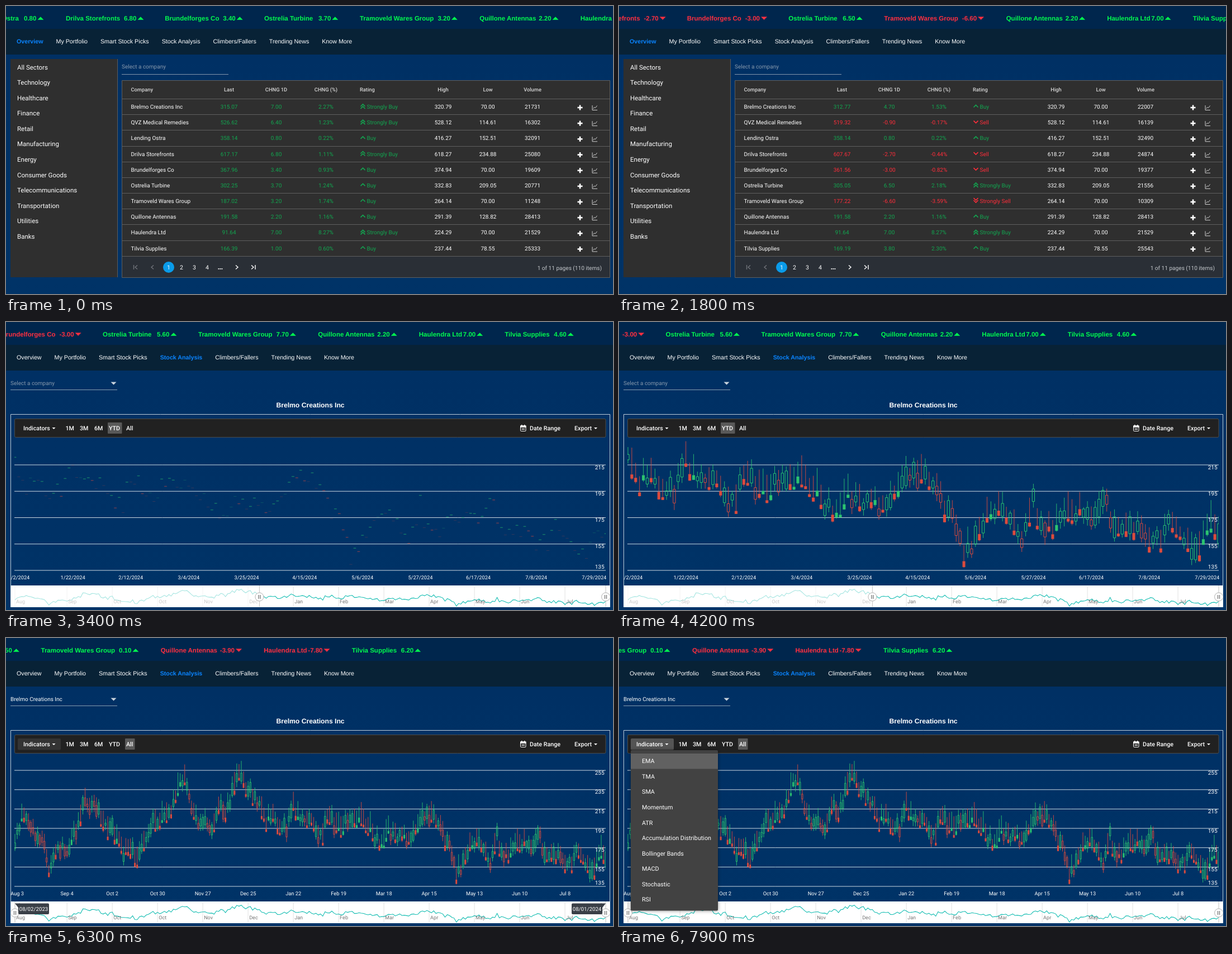
These frames come from a looping animation (1086 px wide and 516 px high, 8000 ms). An HTML page with a canvas:

```html
<!DOCTYPE html>
<html lang="en">
<head>
<meta charset="utf-8">
<title>Stock dashboard</title>
<style>
html, body { margin: 0; width: 100%; height: 100%; overflow: hidden; background: #003166; }
canvas { display: block; width: 1086px; height: 516px; }
</style>
</head>
<body>
<canvas id="stage"></canvas>
<script>
const W = 1086, H = 516, LOOP = 8000, STEP = 100;
const canvas = document.getElementById('stage');
const dpr = window.devicePixelRatio || 1;
canvas.width = W * dpr;
canvas.height = H * dpr;
const c = canvas.getContext('2d');
c.textRendering = 'geometricPrecision';

const ROBOTO = 'Roboto, sans-serif', ARIAL = '"Liberation Sans", Arial, sans-serif';
const UP = '#2ecc71', DOWN = '#e74c3c';

// name, base price, changes over time, high, low, volumes, ticker pitch, value offset
const stocks = [
  ['Brelmo Creations Inc', 308.07, [7, 4.7], '320.79', '70.00', [21731, 22007]],
  ['QVZ Medical Remedies', 520.22, [6.4, -0.9], '528.12', '114.61', [16302, 16139]],
  ['Lending Ostra', 357.34, [0.8, 0.8, 0.8, 0.8], '416.27', '152.51', [32091, 32490], 162, 87],
  ['Drilva Storefronts', 610.37, [6.8, -2.7, 2.9, 2.9], '618.27', '234.88', [25080, 24874], 177.3, 104],
  ['Brundelforges Co', 364.56, [3.4, -3, -3, 1.2], '374.94', '70.00', [19609, 19377], 177.6, 104],
  ['Ostrelia Turbine', 298.55, [3.7, 6.5, 5.6, 2.5], '332.83', '209.05', [20771, 21556], 171, 97],
  ['Tramoveld Wares Group', 183.82, [3.2, -6.6, 7.7, 0.1], '264.14', '70.00', [11248, 10309], 214.3, 139.5],
  ['Quillone Antennas', 189.38, [2.2, 2.2, 2.2, -3.9], '291.39', '128.82', [28413, 28413], 180.5, 106],
  ['Haulendra Ltd', 84.64, [7, 7, 7, -7.8], '224.29', '70.00', [21529, 21529], 153.5, 79],
  ['Tilvia Supplies', 165.39, [1, 3.8, 4.6, 6.2], '237.44', '78.55', [25333, 25543], 150, 88]
].map(([name, base, chg, high, low, vol, pitch, off]) => ({ name, base, chg, high, low, vol, pitch, off }));

const tabs = ['Overview', 'My Portfolio', 'Smart Stock Picks', 'Stock Analysis', 'Climbers/Fallers', 'Trending News', 'Know More'];
const sectors = ['All Sectors', 'Technology', 'Healthcare', 'Finance', 'Retail', 'Manufacturing', 'Energy',
  'Consumer Goods', 'Telecommunications', 'Transportation', 'Utilities', 'Banks'];
const indicators = ['EMA', 'TMA', 'SMA', 'Momentum', 'ATR', 'Accumulation Distribution', 'Bollinger Bands', 'MACD', 'Stochastic', 'RSI'];
const months = ['Jan', 'Feb', 'Mar', 'Apr', 'May', 'Jun', 'Jul', 'Aug', 'Sep', 'Oct', 'Nov', 'Dec'];

// Trend of the price, one point per three trading days
const trend = [183, 205, 198, 189, 189, 155, 168, 177, 175, 190, 219, 216, 217, 206, 193, 189, 170, 170, 164, 183,
  193, 204, 210, 214, 240, 249, 219, 201, 204, 196, 220, 207, 236, 254, 238, 233, 218, 203, 207, 196, 195, 217,
  208, 206, 199, 185, 208, 198, 201, 201, 201, 208, 200, 187, 177, 194, 187, 190, 182, 190, 208, 211, 203, 190,
  177, 148, 161, 178, 185, 169, 161, 187, 166, 169, 182, 179, 177, 187, 172, 169, 172, 159, 161, 172, 161, 145, 172, 163];
const LAST = 261, YTD = 108, X0 = 16, X1 = 1073, BASE = 445;

const candles = makeCandles();

function makeCandles() {
  let seed = 41;
  const rnd = () => (seed = (seed * 16807) % 2147483647) / 2147483647;
  for (let i = 0; i < 9; i++) rnd();
  let prev = 180;
  return Array.from({ length: LAST + 1 }, (_, i) => {
    const k = Math.floor(i / 3), f = i / 3 - k;
    const mid = lerp(trend[k], trend[Math.min(k + 1, trend.length - 1)], f) + (rnd() - 0.5) * 10;
    const low = Math.max(136, mid - 6 - 5 * rnd()), high = mid + 5 + 10 * rnd();
    const open = low + 2 + 4 * rnd();
    const close = rnd() < 0.4 ? low + (open - low) * 0.3 * rnd() : lerp(open, high, 0.3 + 0.55 * rnd());
    const color = close < prev ? DOWN : UP;
    prev = close;
    return { low, high, open, close, color };
  });
}

function lerp(a, b, f) { return a + (b - a) * f; }
function clamp01(v) { return Math.max(0, Math.min(1, v)); }

function track(keys, t) {
  let i = 1;
  while (i < keys.length - 1 && keys[i][0] < t) i++;
  const [ta, a] = keys[i - 1], [tb, b] = keys[i];
  return lerp(a, b, (t - ta) / (tb - ta));
}

function text(s, x, y, size, color = '#fff', { weight = 400, align = 'left', font = ROBOTO } = {}) {
  c.font = `${weight} ${size}px ${font}`;
  c.textAlign = align;
  c.fillStyle = color;
  c.fillText(s, x, y + size * 0.36);
}

function rect(x, y, w, h, fill, stroke, r = 0) {
  c.beginPath();
  c.roundRect(x, y, w, h, r);
  if (fill) { c.fillStyle = fill; c.fill(); }
  if (stroke) { c.strokeStyle = stroke; c.lineWidth = 1; c.stroke(); }
}

function line(points, color, width = 1) {
  c.beginPath();
  points.forEach(([x, y]) => c.lineTo(x, y));
  c.strokeStyle = color;
  c.lineWidth = width;
  c.stroke();
}

function poly(points, color) {
  c.beginPath();
  points.forEach(([x, y]) => c.lineTo(x, y));
  c.fillStyle = color;
  c.fill();
}

// dir: 1 points down, -1 points up
function caret(x, y, w, dir, color) {
  const h = w / 4 * dir;
  poly([[x - w / 2, y - h], [x + w / 2, y - h], [x, y + h]], color);
}

function hline(x1, x2, y, color) { line([[x1, y], [x2, y]], color); }

function dayDate(i) {
  const n = i + 2;
  return new Date(Date.UTC(2023, 6, 31 + Math.floor(n / 5) * 7 + n % 5));
}
function longDate(i, pad) {
  const d = dayDate(i), p = v => pad ? String(v).padStart(2, '0') : v;
  return `${p(d.getUTCMonth() + 1)}/${p(d.getUTCDate())}/${d.getUTCFullYear()}`;
}
function shortDate(i) {
  const d = dayDate(i);
  return `${months[d.getUTCMonth()]} ${d.getUTCDate()}`;
}

const tickerPath = [[0, 107], [1000, 12], [2200, -95.3], [3200, -185.9], [3400, -185.9], [3500, -213],
  [5200, -364.4], [6300, -463.4], [7900, -609.2], [8000, -618.3]];

function drawTicker(t) {
  const set = t < 1000 ? 0 : t < 2000 ? 1 : t < 4300 ? 2 : 3;
  const style = { weight: 700, font: ARIAL };
  let x = track(tickerPath, t) - stocks[2].pitch;
  for (const s of stocks.slice(2)) {
    const v = s.chg[set], neg = v < 0, color = neg ? '#ff2f40' : '#00fa4f';
    text(s.name, x, 22, 11.5, color, style);
    text(v.toFixed(2), x + s.off, 22, 11.5, color, style);
    caret(x + s.off + c.measureText(v.toFixed(2)).width + 7.5, 22, 11, neg ? 1 : -1, color);
    x += s.pitch + (neg ? 4 : 0);
  }
}

function drawTabs(active) {
  let x = 19;
  tabs.forEach((s, i) => {
    const on = i === active;
    text(s, x, 63.5, 10.7, on ? '#0a84ff' : '#fff', { weight: on ? 700 : 400, font: ARIAL });
    x += c.measureText(s).width + 23;
  });
}

function drawFrame() {
  const g = c.createLinearGradient(0, 87, 0, H);
  g.addColorStop(0, '#003064');
  g.addColorStop(1, '#003367');
  c.fillStyle = g;
  c.fillRect(0, 0, W, H);
  rect(0, 0, W, 41, '#00264d');
  rect(0, 41, W, 46, '#082236');
}

function drawRating(v, y, color) {
  const dir = v > 0 ? 1 : -1, strong = Math.abs(v) > 6;
  const mark = yy => line([[634.5, yy + 4 * dir], [638.5, yy], [642.5, yy + 4 * dir]], color, 1.6);
  if (strong) { mark(y - 1 - 3.5 * dir); mark(y - 1 + 0.5 * dir); }
  else mark(y - 1 - 2 * dir);
  text((strong ? 'Strongly ' : '') + (v > 0 ? 'Buy' : 'Sell'), 645.5, y, 10, color);
}

function drawPager() {
  const y = 468, dim = '#70747a', white = '#fff';
  const arrow = (x, dir, color) => line([[x - 2 * dir, y - 3.5], [x + 2 * dir, y], [x - 2 * dir, y + 3.5]], color, 1.4);
  arrow(233, -1, dim);
  line([[228.5, y - 4], [228.5, y + 4]], dim, 1.4);
  arrow(262, -1, dim);
  c.beginPath();
  c.arc(291, y, 10, 0, Math.PI * 2);
  c.fillStyle = '#0a9be9';
  c.fill();
  ['1', '2', '3', '4'].forEach((s, i) => text(s, 291 + i * 23, y + 0.5, 10.5, white, { align: 'center' }));
  for (let i = 0; i < 3; i++) rect(379.5 + i * 3, 470, 1.8, 1.8, white);
  arrow(413, 1, white);
  arrow(441, 1, white);
  line([[446, y - 4], [446, y + 4]], white, 1.4);
  text('1 of 11 pages (110 items)', 1066, 469.5, 10.1, '#c4c8cc', { align: 'right' });
}

function drawOverview(t) {
  const set = t < 1000 ? 0 : 1, mid = { align: 'center' };
  rect(8, 95, 191.5, 391, '#2f2f2f');
  line([[199.5, 95], [199.5, 486]], '#5c5c5c');
  sectors.forEach((s, i) => text(s, 20, 109.5 + i * 27.57, 11.5));

  text('Select a company', 207, 108.5, 10, '#8798ac');
  hline(207, 398, 122.5, '#8396ab');

  rect(207.5, 133.5, 873, 353, '#2f2f2f', '#5f5f5f');
  rect(208, 448, 872, 38, '#2a2f36');
  const head = { weight: 500, align: 'center' }, grey = '#d6d6d6';
  text('Company', 223.5, 150, 9.3, grey, { weight: 500 });
  text('Rating', 633, 150, 9.3, grey, { weight: 500 });
  [['Last', 399], ['CHNG 1D', 483.5], ['CHNG (%)', 572.5], ['High', 782], ['Low', 862], ['Volume', 942]]
    .forEach(([s, x]) => text(s, x, 150, 9.3, grey, head));

  stocks.forEach((s, i) => {
    const y = 180.5 + i * 28.17, v = s.chg[set], color = v < 0 ? '#ff2d3a' : '#12a650';
    hline(208, 1080, Math.round(y - 14.5) + 0.5, '#5f5f5f');
    text(s.name, 223.5, y, 10);
    text((s.base + v).toFixed(2), 399, y, 10, color, mid);
    text(v.toFixed(2), 483.5, y, 10, color, mid);
    text((v / s.base * 100).toFixed(2) + '%', 572.5, y, 10, color, mid);
    drawRating(v, y, color);
    text(s.high, 782, y, 10, '#fff', mid);
    text(s.low, 862, y, 10, '#fff', mid);
    text(s.vol[set], 942, y, 10, '#fff', mid);
    const iy = y + 1.5;
    line([[1022.5, iy], [1031.5, iy]], '#fff', 2.6);
    line([[1027, iy - 4.5], [1027, iy + 4.5]], '#fff', 2.6);
    line([[1049, iy - 4], [1049, iy + 4.5], [1058, iy + 4.5]], '#d0d0d0', 1);
    line([[1050.5, iy + 2], [1052.5, iy - 0.5], [1054.5, iy + 0.5], [1057.5, iy - 3.5]], '#d0d0d0', 1);
  });
  hline(208, 1080, 448.5, '#5f5f5f');
  drawPager();
}

function drawSelect(t) {
  const chosen = t >= 4600;
  text(chosen ? stocks[0].name : 'Select a company', 8, 109.5, 10, chosen ? '#fff' : '#8798ac');
  hline(8, 199, 121.5, '#8a9cb0');
  caret(192.5, 110, 10, 1, '#c9d3de');
}

function drawToolbar(t) {
  rect(15.5, 173.5, 1057.5, 33, '#212121', '#4c4c4c', 2);
  if (t >= 6200) rect(21, 180, 77, 20.5, t < 6600 ? '#343434' : '#555', null, 2);
  if (t < 5000) rect(182, 180, 25.5, 20, '#595959', null, 1);
  else rect(213, 180, 17.5, 20, '#595959', null, 1);
  const w = { weight: 500 };
  text('Indicators', 31, 190, 10.7, '#fff', w);
  caret(85.5, 190.5, 6, 1, '#fff');
  [['1M', 106.5], ['3M', 132], ['6M', 158], ['YTD', 184], ['All', 215]].forEach(([s, x]) => text(s, x, 190, 10.7, '#fff', w));
  rect(920.5, 186, 9.5, 9.5, null, '#fff', 1);
  rect(920, 185.5, 10.5, 3.5, '#fff');
  rect(922, 184, 1.4, 3, '#fff');
  rect(927, 184, 1.4, 3, '#fff');
  rect(922.5, 191, 5.5, 1.5, '#fff');
  text('Date Range', 937, 190, 10.7, '#fff', w);
  text('Export', 1017, 190, 10.7, '#fff', w);
  caret(1055, 190.5, 6, 1, '#fff');
}

function pixelsPerUnit(left) {
  return track([[0, 1.7325], [99, 1.7325], [102, 1.9125], [YTD, 2.3625]], left);
}

function drawPlot(t, left) {
  const ppu = pixelsPerUnit(left), step = (X1 - X0) / (LAST - left);
  const px = i => X1 - (LAST - i) * step, py = v => BASE - (v - 135) * ppu;

  for (let v = 135; py(v) > 213; v += 20) hline(15, X1, py(v), 'rgba(255,255,255,.8)');

  if (t >= 3400) {
    const grow = 1 - Math.pow(1 - clamp01((t - 3400) / 800), 3);
    c.save();
    c.beginPath();
    c.rect(15, 207, X1 - 15, BASE - 206);
    c.clip();
    c.globalAlpha = lerp(0.35, 0.95, grow);
    const w = step * 0.72 - 0.7;
    candles.forEach((d, i) => {
      if (i < left) return;
      const x = px(i), m = (d.open + d.close) / 2, y = v => py(lerp(m, v, grow));
      const top = y(Math.max(d.open, d.close)), bottom = y(Math.min(d.open, d.close));
      line([[x, y(d.high)], [x, top]], d.color, 0.9);
      line([[x, bottom], [x, y(d.low)]], d.color, 0.9);
      const h = Math.max(bottom - top, 0.6);
      if (d.close < d.open) rect(x - w / 2 - 0.4, top, w + 0.8, Math.max(h, grow * 5), d.color);
      else rect(x - w / 2, top, w, h, null, d.color);
    });
    c.restore();
  }

  for (let v = 135; py(v) > 213; v += 20) text(v, 1070.5, v === 135 ? 438.5 : py(v) + 4, 10, '#fff', { align: 'right' });

  const wide = LAST - left > 200, gap = wide ? 20 : 15, label = wide ? shortDate : i => longDate(i);
  const mark = i => text(label(i), px(i), 457.5, 9.25, '#fff', { align: 'center' });
  let first = left;
  while (first % 5 !== 3) first++;
  c.save();
  c.beginPath();
  c.rect(8, 447, 1072, 22);
  c.clip();
  mark(left + 1);
  for (let i = first + gap; i <= 258; i += gap) mark(i);
  c.restore();
}

function drawHandle(x) {
  line([[x, 472], [x, 511]], '#c2c2c2');
  c.beginPath();
  c.arc(x, 492.5, 7.5, 0, Math.PI * 2);
  c.fillStyle = '#fff';
  c.fill();
  c.strokeStyle = '#b0b0b0';
  c.lineWidth = 1;
  c.stroke();
  line([[x - 1.5, 489], [x - 1.5, 496]], '#6a6a6a', 1.2);
  line([[x + 1.5, 489], [x + 1.5, 496]], '#6a6a6a', 1.2);
}

function drawTip(x, label) {
  const color = '#3a3f47', side = x > 90 ? -1 : 1, near = x + side * 6;
  rect(side < 0 ? near - 55 : near, 475.5, 55, 19.5, color, null, 2);
  poly([[x, 475.5], [near + side * 3, 475.5], [near, 483]], color);
  text(label, near + side * 27.5, 485.5, 9.7, '#fff', { align: 'center' });
}

function drawNavigator(t, left) {
  const px = i => X0 + i * (X1 - X0) / LAST;
  rect(8.5, 472, 1072, 39, '#fff');
  const marks = [0];
  for (let i = 23; i < LAST; i += 20) marks.push(i);
  marks.forEach(i => line([[px(i), 474], [px(i), 510]], '#e2e2e2'));
  line(candles.map((d, i) => [px(i), 509.5 - (d.close - 136) * 0.265]), '#14bdb2', 1.1);
  marks.forEach(i => text(months[dayDate(i).getUTCMonth()], px(i) + 2, 501, 9.1, '#767676'));
  rect(8.5, 472, px(left) - 8.5, 39, 'rgba(255,255,255,.62)');
  drawHandle(px(left));
  drawHandle(X1);
  if (t >= 5000 && t < 6500) {
    drawTip(px(left), longDate(Math.floor(left), true));
    drawTip(X1, '08/01/2024');
  }
}

function drawMenu(t) {
  c.save();
  c.shadowColor = 'rgba(0,0,0,.45)';
  c.shadowBlur = 6;
  rect(21, 201, 156, 287.5, '#424242', null, 2);
  c.restore();
  if (t >= 7200) rect(21, 207, 156, 27.5, '#616161');
  indicators.forEach((s, i) => text(s, 41, 220.5 + i * 27.55, 10.75));
}

function drawAnalysis(t) {
  drawSelect(t);
  if (t < 2700) {
    rect(-4, 509.5, 370, 12, '#dfe6f6', null, 3);
    text('Waiting for app.service.info...', 3, 517, 8, '#44484f');
  }
  if (t < 2900) return;
  const slide = (1 - Math.cos(Math.PI * clamp01((t - 5100) / 700))) / 2;
  const left = YTD * (1 - slide);
  text(stocks[0].name, 544.5, 149, 12.15, '#fff', { weight: 700, align: 'center', font: ARIAL });
  drawPlot(t, Math.floor(left));
  drawToolbar(t);
  drawNavigator(t, left);
  rect(8.5, 165.5, 1072, 345, null, 'rgba(255,255,255,.75)');
  if (t >= 6600) drawMenu(t);
}

function draw() {
  const t = Math.floor((performance.now() % LOOP) / STEP) * STEP;
  const analysis = t >= 1900;
  c.setTransform(dpr, 0, 0, dpr, 0, 0);
  drawFrame();
  drawTicker(t);
  drawTabs(analysis ? 3 : 0);
  if (analysis) drawAnalysis(t);
  else drawOverview(t);
  requestAnimationFrame(draw);
}
requestAnimationFrame(draw);
</script>
</body>
</html>
```
